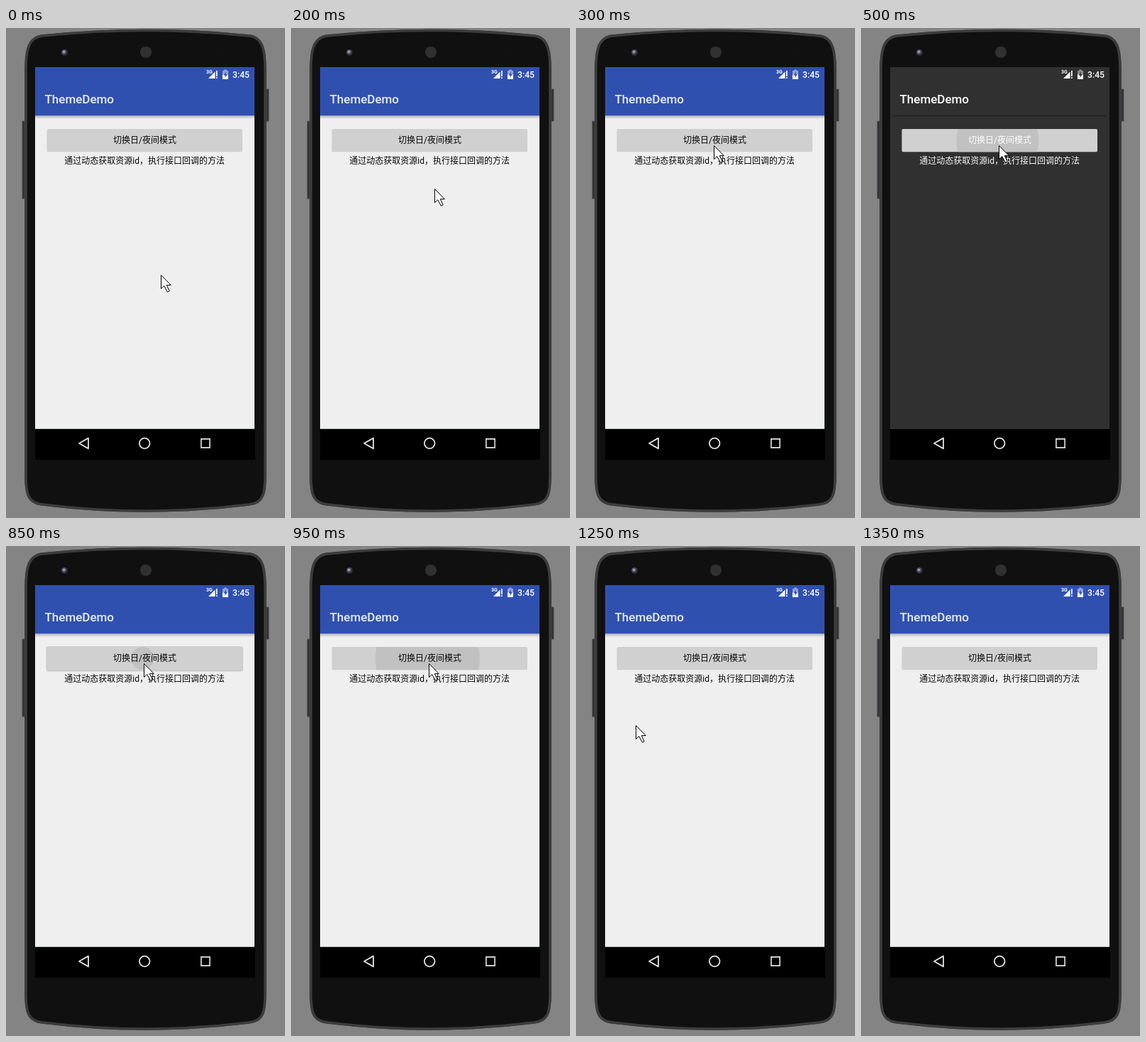
An HTML page for the animation above (1650 ms loop, 393x689 px).

```html
<!DOCTYPE html>
<html lang="zh-CN">
<head>
<meta charset="utf-8">
<title>ThemeDemo</title>
<style>
  html, body { margin: 0; width: 100%; height: 100%; overflow: hidden; background: #848484; }
  svg { display: block; width: 100%; height: 100%; }
  text { font-family: Roboto, "Noto Sans CJK SC", "Noto Sans CJK", sans-serif; font-size: 12px; }
  svg { --bar: #3050b0; --page: #efefef; --ink: #080808; --label: #080808; --title: #e8edf8; --icon: #93a3d4; --edge: #a9bfae; }
  svg.night { --bar: #303030; --page: #303030; --ink: #f8f8f8; --label: #fff; --title: #fff; --icon: #8c8c8c; --edge: #303030; }
  .day-only { display: inline; }
  .night-only { display: none; }
  .night .day-only { display: none; }
  .night .night-only { display: inline; }
</style>
</head>
<body>
<svg id="stage" viewBox="0 0 393 689">
  <defs>
    <linearGradient id="shade" x1="0" y1="0" x2="0" y2="1">
      <stop offset="0" stop-color="#b4b4b8"/>
      <stop offset=".5" stop-color="#d8d8d8"/>
      <stop offset="1" stop-color="#efefef"/>
    </linearGradient>
    <radialGradient id="lens" cx=".4" cy=".4">
      <stop offset="0" stop-color="#d0d0e0"/>
      <stop offset=".45" stop-color="#606078"/>
      <stop offset="1" stop-color="#282830"/>
    </radialGradient>
    <pattern id="mesh" width="3" height="3" patternUnits="userSpaceOnUse">
      <path d="M0 0h1.4v1.4H0zM1.5 1.5h1.4v1.4H1.5z" fill="#484848"/>
    </pattern>
    <clipPath id="buttonClip"><rect x="57.5" y="142" width="275.5" height="32.3" rx="2"/></clipPath>
  </defs>

  <!-- phone -->
  <rect width="393" height="689" fill="#848484"/>
  <path d="M26 131h-3v109h3zM367 86h3v45h-3z" fill="#303036" stroke="#484848" stroke-width=".7"/>
  <path id="shell" d="M28 62C28 34 30 13 52 11Q197 -4 342 11C363 13 365 34 365 62V628C365 654 363 668 342 670Q197 688 52 670C30 668 28 654 28 628Z"
        fill="#101010" stroke="#3c3c3c" stroke-width="3.6"/>
  <use href="#shell" fill="none" style="stroke-width:1"/>
  <circle cx="82.5" cy="34.5" r="4.5" fill="url(#lens)"/>
  <circle cx="197" cy="34" r="8" fill="#1c1c1c"/>
  <circle cx="197" cy="34" r="8" fill="url(#mesh)"/>
  <circle cx="305.5" cy="35" r="1.5" fill="#1a1418"/>

  <!-- app -->
  <rect x="41" y="55" width="309" height="509" fill="var(--page)"/>
  <rect x="41" y="55" width="309" height="68.5" fill="var(--bar)"/>
  <rect class="day-only" x="41" y="123.5" width="309" height="5" fill="url(#shade)"/>
  <path class="night-only" d="M44 123.5H346" stroke="#1a1a1a"/>
  <rect x="41" y="563" width="309" height="1" fill="var(--edge)"/>
  <rect x="41" y="564" width="310" height="43"/>
  <text x="54.5" y="106" fill="var(--title)" font-weight="500" style="font-size:17px">ThemeDemo</text>

  <!-- status bar -->
  <g fill="#fff">
    <text x="282" y="64" font-weight="700" style="font-size:7px">3G</text>
    <path d="M285 71L294.5 61.5V71Z"/>
    <path d="M296 60h1.7v8H296zM296 69.3h1.7V71H296z"/>
    <path d="M305 60h2.3v-1.5h3.4V60h2.3v12h-8z" fill="var(--icon)"/>
    <path d="M305 65.5h8V72h-8z"/>
    <path d="M309.8 61.5l-3.2 5h2v3.5l3.2-5h-2z" fill="var(--bar)"/>
    <text x="319" y="70" font-weight="500" style="font-size:12.2px">3:45</text>
  </g>

  <!-- content -->
  <rect id="lift" x="56.5" y="141" width="277.5" height="35.5" rx="3" fill="#b8b8b8" opacity=".65"/>
  <rect x="57.5" y="142" width="275.5" height="32.3" rx="2" fill="#d0d0d0"/>
  <circle id="ripple" cx="192.3" cy="158" r="0" fill="#c1c1c1" clip-path="url(#buttonClip)"/>
  <text x="195.5" y="162.4" text-anchor="middle" fill="var(--label)">切换日/夜间模式</text>
  <text x="195.2" y="191.4" text-anchor="middle" fill="var(--ink)">通过动态获取资源id，执行接口回调的方法</text>

  <!-- navigation -->
  <g fill="none" stroke="#e4e4e4" stroke-width="1.8" stroke-linejoin="round">
    <path d="M103 584L116 576.6V591.4Z"/>
    <circle cx="195.2" cy="584" r="7.3"/>
    <path d="M274.9 577.9h12.2v12.2h-12.2z" stroke-linejoin="miter" stroke-width="1.6"/>
  </g>

  <path id="cursor" d="M.5 .5V19.5L4.8 15.6L9.4 24.2L12.2 22.8L8.3 14.6H14.3Z" fill="#fff" stroke="#000"/>
</svg>
<script>
  const LOOP = 1650;
  const get = id => document.getElementById(id);
  const [stage, lift, ripple, cursor] = ['stage', 'lift', 'ripple', 'cursor'].map(get);

  const steps = [
    { at: 0, pos: [218, 347] },
    { at: 100, pos: [210, 286] },
    { at: 200, pos: [202, 226] },
    { at: 300, pos: [194, 165] },
    { at: 500, pos: [194, 165], radius: 58, night: true },
    { at: 850, pos: [194, 165], radius: 16, raised: true },
    { at: 950, pos: [194, 165], radius: 73.5 },
    { at: 1250, pos: [84, 252] },
    { at: 1350 }
  ];

  let shown;
  function draw(now) {
    const time = now % LOOP;
    const step = steps.findLast(s => s.at <= time);
    if (step !== shown) {
      shown = step;
      const { pos, radius = 0, night = false, raised = false } = step;
      stage.classList.toggle('night', night);
      lift.style.display = raised ? '' : 'none';
      ripple.setAttribute('r', radius);
      cursor.style.display = pos ? '' : 'none';
      if (pos) cursor.setAttribute('transform', `translate(${pos})`);
    }
  }

  const start = performance.now();
  function tick() {
    draw(performance.now() - start);
    requestAnimationFrame(tick);
  }
  tick();
</script>
</body>
</html>
```
